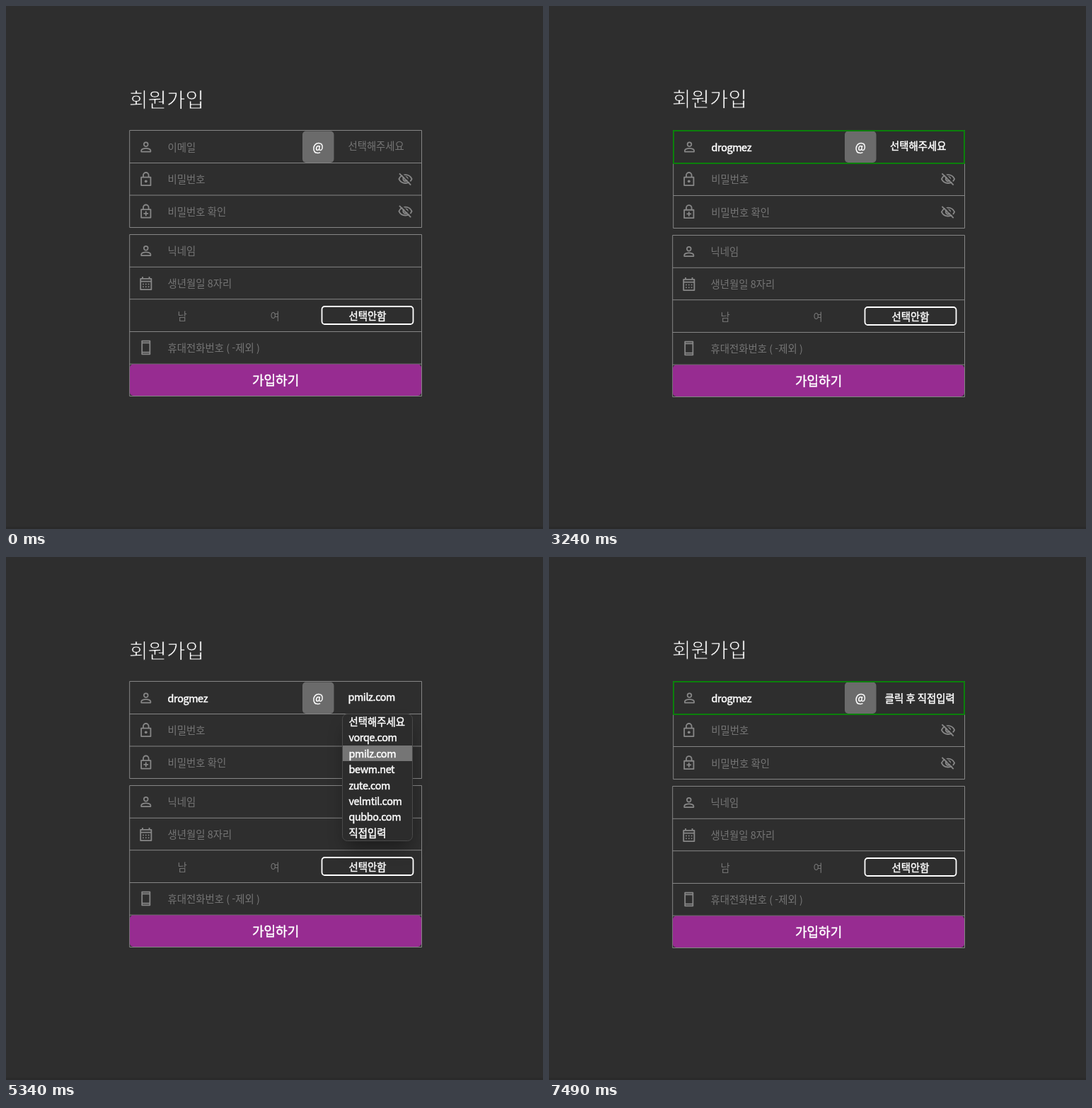
Recreate the animation shown at these times as an HTML page with a canvas. Size 759 by 738 pixels, loop 8000 ms.

```html
<!DOCTYPE html>
<html lang="ko">
<head>
<meta charset="utf-8">
<title>회원가입</title>
<style>
html, body { margin: 0; width: 100%; height: 100%; overflow: hidden; background: #2e2e2e; }
canvas { display: block; }
</style>
</head>
<body>
<canvas id="stage" width="759" height="738"></canvas>
<script>
const ctx = document.getElementById('stage').getContext('2d', { alpha: false });
const LOOP = 8000;
const BG = '#2e2e2e', LINE = '#858585', HINT = '#757575', ICON = '#878787', WHITE = '#fff';
const USER = 'drogmez';
const PICK = '선택해주세요';
const OPTIONS = [PICK, 'vorqe.com', 'pmilz.com', 'bewm.net', 'zute.com', 'velmtil.com', 'qubbo.com', '직접입력'];
const SIZE = 14.4;

// Each step changes part of the form state from its time on.
const START = { focus: '', caret: false, typed: '', label: PICK, lit: false, open: false, row: 0, custom: false };
const STEPS = [
  [390, { focus: 'user', caret: true }],
  [920, { caret: false }],
  [970, { typed: USER.slice(0, 1), caret: true }],
  [1110, { typed: USER.slice(0, 2) }],
  [1200, { lit: true }],
  [1350, { typed: USER.slice(0, 3) }],
  [1530, { typed: USER.slice(0, 4) }],
  [1650, { typed: USER.slice(0, 5) }],
  [1780, { typed: USER.slice(0, 6) }],
  [1900, { typed: USER }],
  [2170, { typed: USER + '@' }],
  [2600, { typed: USER, caret: false }],
  [2700, { caret: true }],
  [3240, { caret: false }],
  [3550, { focus: '' }],
  [3580, { open: true }],
  [4560, { row: 1 }],
  [4640, { row: 2 }],
  [4900, { open: false }],
  [4930, { label: OPTIONS[2] }],
  [5310, { open: true }],
  [5490, { row: 3 }],
  [5520, { row: 4 }],
  [5550, { row: 5 }],
  [5580, { row: 6 }],
  [5610, { row: 7 }],
  [6100, { open: false, custom: true }],
  [6960, { focus: 'domain', caret: true }],
  [7490, { caret: false }]
];

const stateAt = t => Object.assign({}, START, ...STEPS.filter(s => s[0] <= t).map(s => s[1]));

// Latin words are set slightly tighter than Hangul.
function setFont(str, size) {
  ctx.font = `400 ${size}px "Noto Sans CJK KR", "Noto Sans KR", "Noto Sans CJK", sans-serif`;
  ctx.letterSpacing = /^[a-z]/.test(str) ? '-0.4px' : '0px';
}

function text(str, x, y, color = HINT, size = SIZE) {
  setFont(str, size);
  ctx.fillStyle = color;
  ctx.fillText(str, x, y);
}

// Regular glyphs become medium with an outline, or light with an outline in the background colour.
function outlined(str, x, y, size, outline, width) {
  text(str, x, y, WHITE, size);
  ctx.strokeStyle = outline;
  ctx.lineWidth = width;
  ctx.lineJoin = 'round';
  ctx.strokeText(str, x, y);
}

const medium = (str, x, y, size = SIZE) => outlined(str, x, y, size, WHITE, 0.45);
const light = (str, x, y, size) => outlined(str, x, y, size, BG, 0.75);

function rounded(x, y, w, h, r) {
  ctx.beginPath();
  ctx.roundRect(x, y, w, h, r);
}

function fillRounded(x, y, w, h, r, color) {
  rounded(x, y, w, h, r);
  ctx.fillStyle = color;
  ctx.fill();
}

function strokeRounded(x, y, w, h, r, color, width) {
  rounded(x, y, w, h, r);
  ctx.strokeStyle = color;
  ctx.lineWidth = width;
  ctx.stroke();
}

function frame(x, y, w, h, dividers) {
  ctx.strokeStyle = LINE;
  ctx.lineWidth = 1;
  ctx.strokeRect(x, y, w, h);
  ctx.beginPath();
  for (const d of dividers) {
    ctx.moveTo(x, d);
    ctx.lineTo(x + w, d);
  }
  ctx.stroke();
}

// Icons live on a 24-unit grid: line work, plus optional dots [x, y, r].
const ICONS = {
  person: ['M15.05 8a3.05 3.05 0 1 1-6.1 0a3.05 3.05 0 1 1 6.1 0zM4.95 19.05V17c0-1.7 4-3.05 7.05-3.05s7.05 1.35 7.05 3.05v2.05z'],
  lock: ['M5 9h14v12H5zM8 9V6a4 4 0 0 1 8 0v3', [[12, 15, 2]]],
  lockPlus: ['M5 9h14v12H5zM8 9V6a4 4 0 0 1 8 0v3M12 11.5v7M8.5 15h7'],
  calendar: ['M4 5h16v16H4zM4 9h16M7 2v3M17 2v3',
    [8, 12, 16].flatMap(x => [[x, 13, 1], [x, 17, 1]])],
  phone: ['M6 2h12v20H6zM6 5h12M6 19h12']
};

function icon(name, cx, cy, scale = 0.93) {
  const [line, dots = []] = ICONS[name];
  ctx.save();
  ctx.translate(cx - 12 * scale, cy - 12 * scale);
  ctx.scale(scale, scale);
  ctx.strokeStyle = ctx.fillStyle = ICON;
  ctx.lineWidth = 1.9;
  ctx.lineJoin = 'round';
  ctx.stroke(new Path2D(line));
  for (const [x, y, r] of dots) {
    ctx.beginPath();
    ctx.arc(x, y, r, 0, Math.PI * 2);
    ctx.fill();
  }
  ctx.restore();
}

function hiddenEye(cx, cy) {
  const s = 0.92;
  const stroke = (d, color) => {
    ctx.strokeStyle = color;
    ctx.stroke(new Path2D(d));
  };
  ctx.save();
  ctx.translate(cx - 12 * s, cy - 12 * s);
  ctx.scale(s, s);
  ctx.lineWidth = 2;
  stroke('M2.1 11.5C6 2.85 18 2.85 21.9 11.5C18 20.15 6 20.15 2.1 11.5z', ICON);
  stroke('M15.5 11.5a3.5 3.5 0 1 1-7 0a3.5 3.5 0 1 1 7 0z', ICON);
  stroke('M4.7 1.7L22.4 19.4', BG);
  stroke('M2.7 3.2L20.4 20.9', ICON);
  ctx.restore();
}

function caret(x) {
  ctx.fillStyle = WHITE;
  ctx.fillRect(Math.floor(x), 188, 1, 21);
}

function emailRow(s, on) {
  const x = 228.6 + on;
  icon('person', 197.8 + on * 0.7, 199);
  if (s.typed) medium(s.typed, x, 205);
  else text('이메일', x, 205);

  fillRounded(419 - on, 176.5, 44.5, 44.5, 5, '#6b6b6b');
  ctx.textAlign = 'center';
  medium('@', 441 - on * 0.7, 205, 16);
  ctx.textAlign = 'left';

  const shift = -1.3 * on;
  if (s.custom) medium('클릭 후 직접입력', 476 + shift, 205);
  else if (s.lit) medium(s.label, 483.4 + shift, 203);
  else text(s.label, 483.4 + shift, 203);

  if (!s.caret) return;
  if (s.focus === 'domain') return caret(475);
  setFont(s.typed, SIZE);
  caret(230 + (s.typed ? ctx.measureText(s.typed).width : 0));
}

function accountBox(s, on) {
  frame(174.7 + on, 175.5, 412.8 - on, 137 + on, [221.5, 267 + on * 0.5]);
  emailRow(s, on);
  if (on) {
    ctx.strokeStyle = '#0b800b';
    ctx.lineWidth = 2;
    ctx.strokeRect(176, 176, 411, 46);
  }
  const eyeX = 564.5 - on * 0.5, hintX = 228.6 + on * 0.7;
  icon('lock', 197.8, 244.5, 0.95);
  text('비밀번호', hintX, 250);
  hiddenEye(eyeX, 244.5);
  icon('lockPlus', 197.8, 290 + on * 0.6, 0.95);
  text('비밀번호 확인', hintX, 296 + on);
  hiddenEye(eyeX, 290 + on);
}

function profileBox() {
  icon('person', 197.8, 345.5);
  text('닉네임', 228.6, 351);
  icon('calendar', 197.8, 391.5, 0.95);
  text('생년월일 8자리', 228.6, 397);
  text('남', 242.6, 443);
  text('여', 373.4, 443);
  strokeRounded(446.5, 424, 129, 25, 4, WHITE, 1.8);
  medium('선택안함', 484.5, 443);
  icon('phone', 197.8, 482);
  text('휴대전화번호 ( -제외 )', 228.6, 488);
  frame(174.7, 322.5, 412.8, 228, [368.3, 413.7, 459.5, 505.2]);
  fillRounded(175, 505.5, 412, 44.5, 5, '#972c91');
  medium('가입하기', 348, 535, 18);
}

function dropdown(row) {
  const x = 476, y = 221.5, w = 99, h = 179, pitch = 22.4;
  ctx.save();
  ctx.shadowColor = 'rgba(0,0,0,.4)';
  ctx.shadowBlur = 24;
  ctx.shadowOffsetY = 14;
  fillRounded(x + 5, y + 5, w - 10, h - 10, 7, '#2c2c2c');
  ctx.restore();
  fillRounded(x, y, w, h, 7, '#2c2c2c');

  ctx.save();
  rounded(x, y, w, h, 7);
  ctx.clip();
  ctx.fillStyle = '#757575';
  ctx.fillRect(x, Math.round(y - 0.5 + row * pitch), w, 22);
  ctx.restore();

  strokeRounded(x - 0.5, y, w, h, 7, '#4a4a4a', 1);
  OPTIONS.forEach((name, i) => medium(name, 484.5, Math.round(238 + i * pitch)));
}

function draw(t) {
  const s = stateAt(t);
  const on = s.focus ? 1 : 0;
  ctx.fillStyle = BG;
  ctx.fillRect(0, 0, 759, 738);
  ctx.fillStyle = '#2a2a2a';
  ctx.fillRect(0, 735, 759, 3);

  light('회원가입', 174, 143 - on * 0.7, 28.8);
  accountBox(s, on);
  ctx.save();
  ctx.translate(0, on);
  profileBox();
  ctx.restore();
  if (s.open) dropdown(s.row);
}

const begin = performance.now();
function tick() {
  draw((performance.now() - begin) % LOOP);
  requestAnimationFrame(tick);
}
tick();
</script>
</body>
</html>
```
